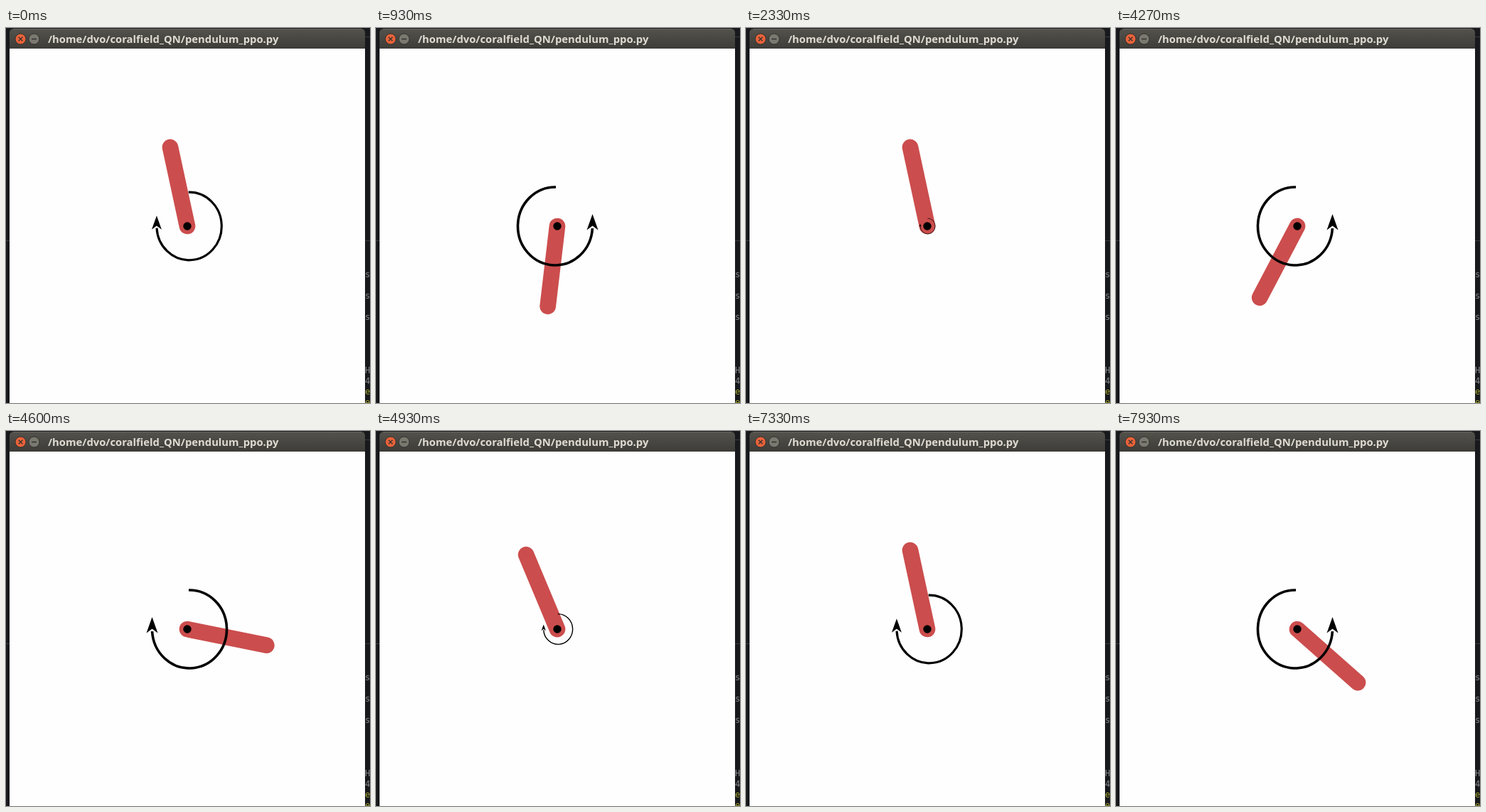
An HTML page for the animation above (8 s loop, 512x528 px).

```html
<!DOCTYPE html>
<html lang="en">
<head>
<meta charset="utf-8">
<title>Pendulum</title>
<style>
  html, body { margin: 0; width: 100%; height: 100%; overflow: hidden; background: #17191c; }
  svg { display: block; width: 100vw; height: 100vh; }
  .title { font: 700 14.8px "Noto Sans", "Open Sans", sans-serif; fill: #dfdbd2; }
  .term { font: 12px "DejaVu Sans Mono", monospace; fill: #85878a; }
  .term .lit { fill: #a6a632; }
</style>
</head>
<body>
<svg viewBox="0 0 512 528">
  <defs>
    <linearGradient id="bar" x2="0" y2="1">
      <stop offset="0" stop-color="#54524c"/>
      <stop offset="1" stop-color="#3d3c38"/>
    </linearGradient>
  </defs>

  <rect width="512" height="528" fill="#17191c"/>
  <path d="M0 299.5H5M505 299.5H512M505 12.5H512" stroke="#3a3b3d"/>
  <g class="term">
    <text x="505" y="351">s</text>
    <text x="505" y="381">s</text>
    <text x="505" y="411">s</text>
    <text x="505" y="486">H</text>
    <text x="505" y="501">4</text>
    <text class="lit" x="505" y="516">e</text>
    <text class="lit" x="505" y="531">e</text>
  </g>

  <path d="M5 29V7Q5 1 11 1H499Q505 1 505 7V29Z" fill="url(#bar)"/>
  <path d="M10 1.5H500" stroke="#6b6962"/>
  <g stroke="#32312d">
    <circle cx="20.5" cy="15.5" r="7.5" fill="#e9623a"/>
    <circle cx="39.5" cy="15.5" r="7.5" fill="#7a786f"/>
    <path d="M17.7 12.7l5.6 5.6m0-5.6l-5.6 5.6M36 15.5h7" stroke-width="1.4"/>
  </g>
  <text class="title" x="59" y="21">/home/dvo/coralfield_QN/pendulum_ppo.py</text>

  <rect x="5" y="29" width="500" height="499" fill="#fefefe"/>
  <g transform="translate(255 279)">
    <path id="rod" d="M0 0V113.6" stroke="#cc4d4d" stroke-width="22.7" stroke-linecap="round"/>
    <circle r="5.7"/>
    <g id="torque">
      <path d="M-2-55A52.5 55 0 1 0 49.4 3" fill="none" stroke="#000" stroke-width="3.6"/>
      <path d="M49.5-17L57.5 5.5L49.5-.5L41.5 5.5Z"/>
    </g>
  </g>
</svg>
<script>
  const LOOP = 8000, TICK = 200 / 3;
  const REST = -167.8;   // balanced pose; angles run counterclockwise from straight down
  const FALL = 2.98;     // ticks, width of the swing from the peak up to the balance

  // Each attempt swings right from a start angle to a peak, then left and up to the balance.
  const attempts = [
    { at: -56, from: -27.7, peak: 81, turn: 4.7 },
    { at: 12, from: -45, peak: 108, turn: 6 },
    { at: 64, from: -27.7, peak: 81, turn: 4.7 },
    { at: 117, from: -11, peak: 108, turn: 4 }
  ];

  const rod = document.getElementById("rod");
  const torque = document.getElementById("torque");

  // The torque that holds the balance flips between a strong and a weak value.
  const grip = tick => tick >= 34 && tick < 88 ? 0.4 : 1.74;

  function pose(tick) {
    const { at, from, peak, turn } = attempts.filter(a => a.at <= tick).pop();
    const n = tick - at;
    if (n < turn) {
      const ease = (1 - Math.cos(Math.PI * n / turn)) / 2;
      return { deg: from + (peak - from) * ease, u: 2 };
    }
    const left = (peak - REST) * Math.exp(-(((n - turn) / FALL) ** 2));
    return { deg: REST + left, u: -Math.min(2, grip(tick) + 0.036 * left) };
  }

  function draw(now) {
    const t = Math.floor((now % LOOP) / 10) * 10;
    const { deg, u } = pose(Math.floor((t + 4) / TICK));
    rod.setAttribute("transform", `rotate(${-deg})`);
    torque.setAttribute("transform", `scale(${u / 2} ${Math.abs(u) / 2})`);
  }

  const start = performance.now();
  function loop() {
    draw(performance.now() - start);
    requestAnimationFrame(loop);
  }
  loop();
</script>
</body>
</html>
```
